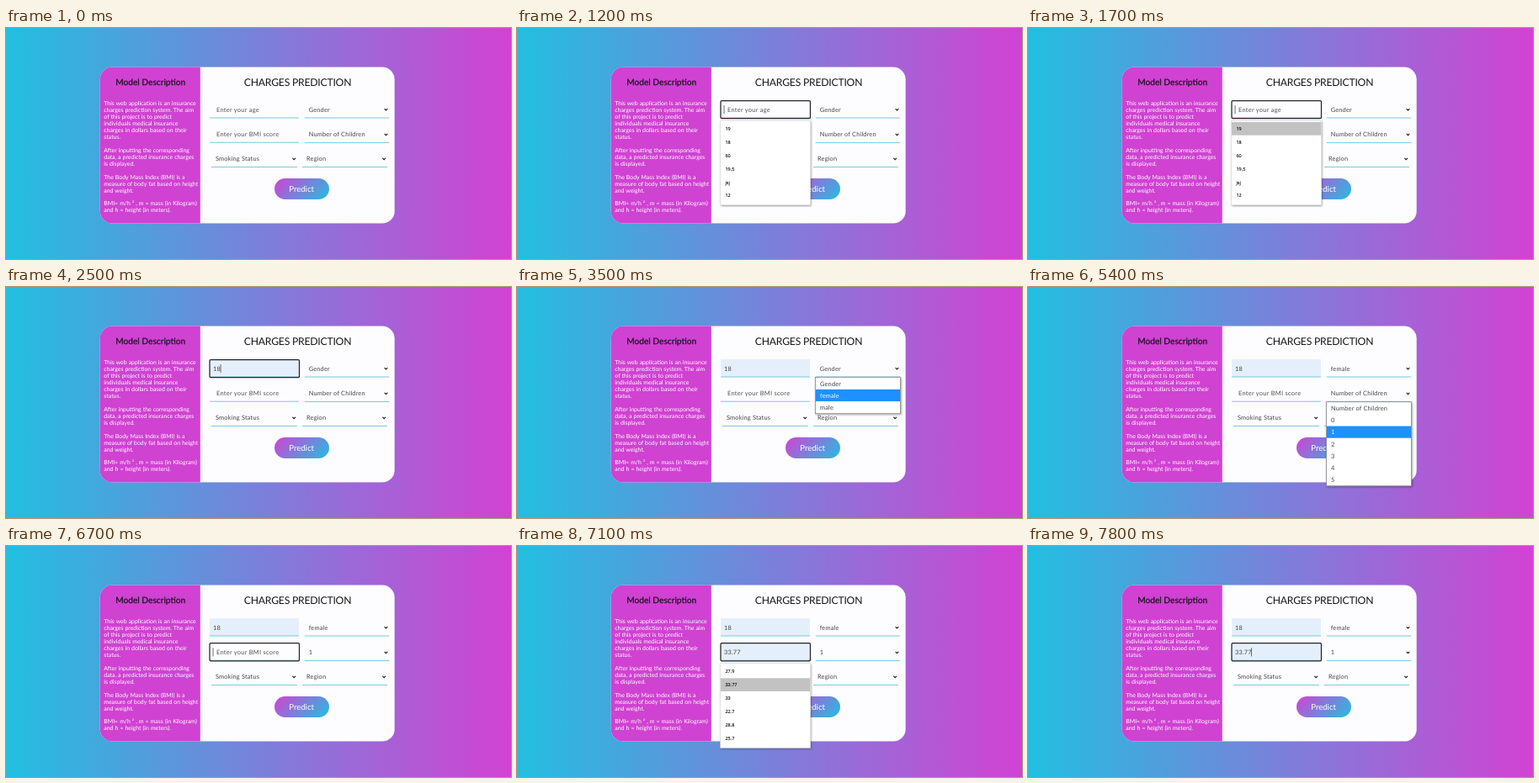
These frames come from a looping animation (600x275 px, 8000 ms). An HTML page:

```html
<!DOCTYPE html>
<html lang="en">
<head>
<meta charset="utf-8">
<title>Charges prediction</title>
<style>
html, body { margin: 0; width: 100%; height: 100%; overflow: hidden; }
svg { display: block; width: 100vw; height: 100vh; }
text { font-family: Lato, sans-serif; white-space: pre; text-rendering: geometricPrecision; }
.note { font-size: 6.9px; fill: #fff; word-spacing: .3px; }
.field { font-size: 7.4px; fill: #444; letter-spacing: .17px; }
.hint { font-size: 7.4px; fill: #505050; letter-spacing: .3px; }
.item { font: 5.5px "Open Sans", sans-serif; fill: #000; stroke: #000; stroke-width: .1px; }
</style>
</head>
<body>
<svg viewBox="0 0 600 275" xmlns="http://www.w3.org/2000/svg">
  <defs>
    <linearGradient id="sky">
      <stop stop-color="#22bfe0"/><stop offset="1" stop-color="#d242d3"/>
    </linearGradient>
    <linearGradient id="pill" gradientUnits="userSpaceOnUse" x1="329" y1="169" x2="374" y2="214">
      <stop stop-color="#d242d3"/><stop offset="1" stop-color="#22bfe0"/>
    </linearGradient>
    <clipPath id="card"><rect x="111.7" y="46.6" width="350" height="186" rx="14.6"/></clipPath>
    <filter id="shade" x="-10%" y="-10%" width="125%" height="125%">
      <feDropShadow dx=".8" dy="1" stdDeviation="1.1" flood-opacity=".4"/>
    </filter>
  </defs>
  <rect width="600" height="275" fill="url(#sky)"/>
  <g clip-path="url(#card)">
    <rect x="111" y="46" width="352" height="188" fill="#fdfdff"/>
    <rect x="111" y="46" width="119.8" height="188" fill="#d042d2"/>
  </g>
  <text x="171.7" y="68.2" font-size="10.2" text-anchor="middle" fill="#1c1420" stroke="#1c1420" stroke-width=".25">Model Description</text>
  <text x="346.5" y="69.1" font-size="12.2" letter-spacing="-.22" text-anchor="middle" fill="#161616">CHARGES PREDICTION</text>
  <g id="notes"></g>
  <rect x="319" y="179" width="65" height="25" rx="12.5" fill="url(#pill)"/>
  <text x="351.1" y="195" font-size="9.6" text-anchor="middle" fill="#fff">Predict</text>
  <g id="form"></g>
</svg>
<script>
const LOOP = 8000;
const NOTES = [
  "This web application is an insurance", "charges prediction system. The aim",
  "of this project is to predict", "individuals medical insurance",
  "charges in dollars based on their", "status.", "",
  "After inputting the corresponding", "data, a predicted insurance charges",
  "is displayed.", "",
  "The Body Mass Index (BMI) is a", "measure of body fat based on height",
  "and weight.", "",
  "BMI= m/h ² , m = mass (in Kilogram)", "and h = height (in meters)."
];
const AGES = ["19", "18", "60", "19.5", "jsj", "12"];
const BMIS = ["27.9", "33.77", "33", "22.7", "28.8", "25.7"];
const GENDERS = ["Gender", "female", "male"];
const COUNTS = ["Number of Children", "0", "1", "2", "3", "4", "5"];

// Each step changes only the listed parts of the form.
const STEPS = [
  [0, { age: "", bmi: "", gender: 0, count: 0, focus: "", caret: 0, open: "", row: -1 }],
  [1200, { focus: "age", caret: 246, open: "age" }],
  [1700, { row: 0 }],
  [1800, { row: 1, age: "18", caret: 0 }],
  [2300, { open: "", row: -1, caret: 255 }],
  [2900, { caret: 0 }],
  [3200, { focus: "", open: "gender", row: 0 }],
  [3500, { row: 1 }],
  [4100, { open: "", gender: 1 }],
  [4600, { open: "count", row: 0 }],
  [5000, { row: 1 }],
  [5100, { row: 2 }],
  [5600, { open: "", count: 2, row: -1 }],
  [6700, { focus: "bmi", caret: 246 }],
  [6800, { open: "bmi" }],
  [7000, { row: 0, bmi: "27.9", caret: 0 }],
  [7100, { row: 1, bmi: "33.77" }],
  [7600, { open: "", row: -1, caret: 265.3 }]
];

const text = (x, y, str, cls, extra = "") =>
  `<text x="${x}" y="${y}" class="${cls}" ${extra}>${str}</text>`;
const rect = (x, y, w, h, fill, extra = "") =>
  `<rect x="${x}" y="${y}" width="${w}" height="${h}" fill="${fill}" ${extra}/>`;
const underline = (x, y, w) => rect(x, y - .45, w, .9, "#66c6d9");

function input(y, value, hint, focused, caret) {
  let out = value ? rect(242, y - 11, 106, 21, "#e5effc") : "";
  out += underline(242, y + 10, 106);
  out += value ? text(246, y + 2.8, value, "field") : text(250, y + 2.8, hint, "hint");
  if (focused) {
    out += rect(242, y - 10.5, 106.5, 21.1, "none", 'rx="1.3" stroke="#222228" stroke-width="1.25"');
    if (caret) out += rect(caret - .3, y - 5, .7, 10.2, "#333");
  }
  return out;
}

function select(x, y, w, label) {
  const ax = x + w - 5.6;
  return underline(x, y + 10, w) + text(x + 5, y + 2.6, label, "field") +
    `<path d="M${ax} ${y - .8}l1.8 1.8l1.8 -1.8" fill="none" stroke="#161616" stroke-width="1.1"/>`;
}

function suggestions(y, items, row) {
  let out = rect(241.6, y, 107, 101, "#fff", 'filter="url(#shade)"') +
    rect(241.8, y + .2, 106.6, 100.6, "#fff", 'stroke="#c8c8c8" stroke-width=".5"');
  items.forEach((str, i) => {
    const top = y + 2 + i * 15.9;
    if (i === row) out += rect(242, top, 106.2, 15.7, "#c2c2c2");
    out += text(247.4, top + 9.9, str, "item");
  });
  return out;
}

function options(y, items, row) {
  const step = 14.15, h = items.length * step + 1;
  let out = rect(354.5, y, 101, h, "#fff", 'stroke="#777" stroke-width=".7" filter="url(#shade)"');
  items.forEach((str, i) => {
    const top = y + .5 + i * step, on = i === row;
    if (on) out += rect(354.9, top, 100.2, step, "#1e90ff");
    out += text(360, top + 9.8, str, "field", on ? 'style="fill:#fff"' : "");
  });
  return out;
}

const POPUPS = {
  age: row => suggestions(110, AGES, row),
  bmi: row => suggestions(139.4, BMIS, row),
  gender: row => options(107.3, GENDERS, row),
  count: row => options(136.8, COUNTS, row)
};

function draw(s) {
  return input(97, s.age, "Enter your age", s.focus === "age", s.caret) +
    input(126.2, s.bmi, "Enter your BMI score", s.focus === "bmi", s.caret) +
    select(354.7, 97, 100.6, GENDERS[s.gender]) +
    select(354.7, 126.6, 100.6, COUNTS[s.count]) +
    select(244, 155.6, 102, "Smoking Status") +
    select(352, 155.6, 101, "Region") +
    (s.open ? POPUPS[s.open](s.row) : "");
}

const form = document.getElementById("form");
document.getElementById("notes").innerHTML =
  NOTES.map((str, i) => text(116.3, 92.3 + i * 7.94, str, "note")).join("");

let shown = -1;
function update(time) {
  const past = STEPS.filter(([at]) => at <= time % LOOP);
  if (past.length !== shown) {
    shown = past.length;
    form.innerHTML = draw(Object.assign({}, ...past.map(step => step[1])));
  }
}

const start = performance.now();
function tick() {
  update(performance.now() - start);
  requestAnimationFrame(tick);
}
tick();
</script>
</body>
</html>
```
